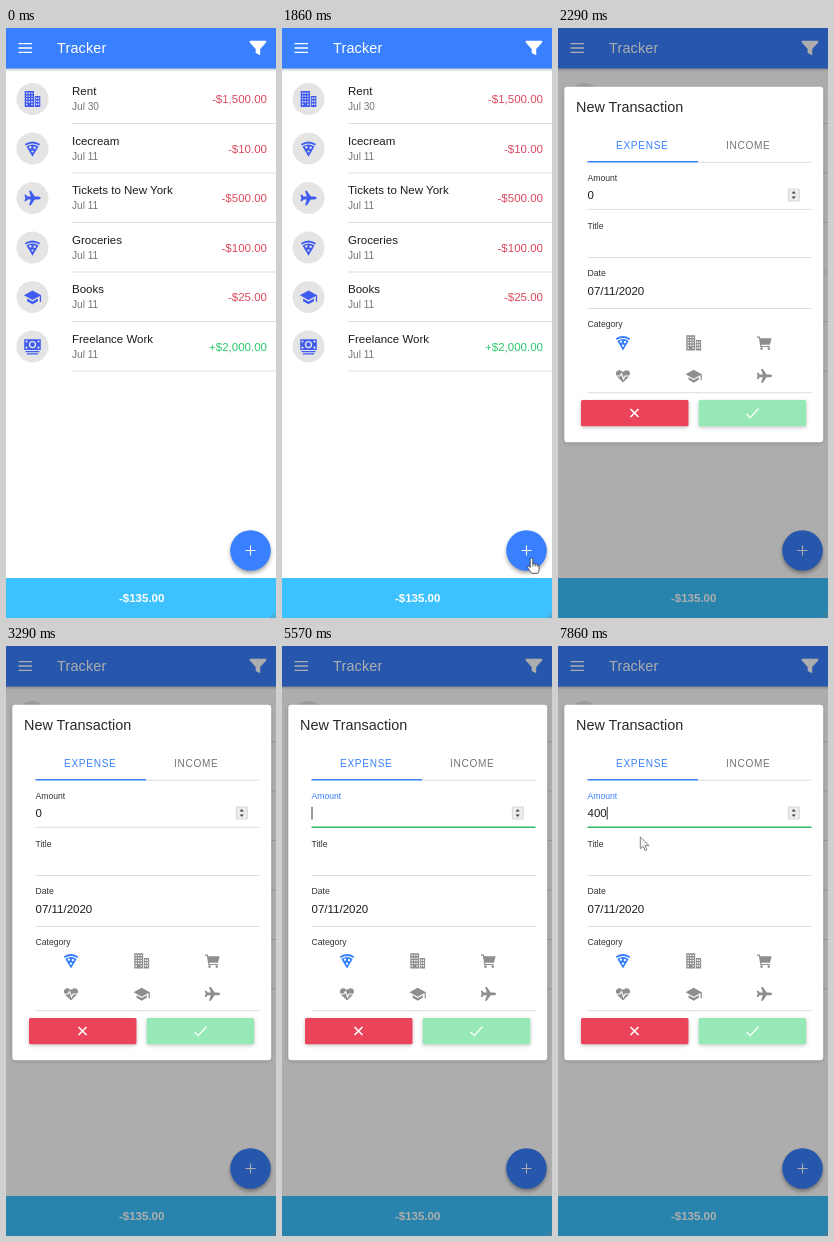
Animation of 270 by 590 pixels, one loop 8000 ms. Source, as an HTML page:

```html
<!DOCTYPE html>
<html lang="en">
<head>
<meta charset="utf-8">
<title>Tracker</title>
<style>
  html, body { margin: 0; width: 100%; height: 100%; overflow: hidden; background: #fff; }
  svg { display: block; width: 270px; height: 590px; }
  text { font-family: "Liberation Sans", Arial, sans-serif; font-size: 11.52px; white-space: pre; }
  .big { font-size: 14.4px; }
  .mid { font-size: 10.08px; }
  .small { font-size: 8.64px; }
</style>
</head>
<body>
<svg id="stage" viewBox="0 0 270 590" xmlns="http://www.w3.org/2000/svg">
  <defs>
    <filter id="soft" x="-30%" y="-30%" width="160%" height="160%"><feGaussianBlur stdDeviation="2.2"/></filter>
    <linearGradient id="fade" x2="0" y2="1">
      <stop stop-color="#000" stop-opacity=".22"/><stop offset="1" stop-color="#000" stop-opacity="0"/>
    </linearGradient>
  </defs>
  <rect width="270" height="590" fill="#fff"/>
  <g id="list"></g>
  <g id="chrome"></g>
  <rect id="shade" width="270" height="590"/>
  <g id="modal"></g>
  <path d="M264.5 590L270 584.5M267.5 590L270 587.5" stroke="#777" stroke-width=".7"/>
  <g id="hand" stroke="#333" stroke-width=".8" stroke-linejoin="round" fill="#fff">
    <path d="M-1.3 1Q-1.3 -.3 0 -.3T1.3 1V5.4Q2.8 4.6 3.6 5.8Q5 5.2 5.8 6.4Q7.6 6 7.6 8V11Q7.6 13 6.3 14.8H.2Q-1.4 12.8 -3.8 9.3Q-4.6 7.8 -3.4 7.5Q-2.4 7.4 -1.3 9Z"/>
    <path d="M1.3 5.4V8M3.6 5.8V8M5.8 6.4V8.2" fill="none"/>
  </g>
  <path id="arrow" d="M0 0V12L2.8 9.5L4.7 13.8L6.6 13L4.8 8.8H8.7Z" fill="#f4f4f4" stroke="#666" stroke-width=".8" stroke-linejoin="round"/>
</svg>
<script>
const el = id => document.getElementById(id);
const BLUE = "#3880ff", RED = "#eb445a", GREEN = "#2dd36f", GREY = "#8e8e8e";

const text = (x, y, s, cls = "", fill = "#1c1c1c", more = "") =>
  `<text x="${x}" y="${y}" class="${cls}" fill="${fill}" ${more}>${s}</text>`;
const line = (x1, x2, y, color = "#dadada", w = 0.9, more = "") =>
  `<path d="M${x1} ${y}H${x2}" stroke="${color}" stroke-width="${w}" ${more}/>`;
const box = (x, y, w, h) => `M${x} ${y}h${w}v${h}h${-w}z`;
const disc = (x, y, r) => `M${x - r} ${y}a${r} ${r} 0 1 0 ${2 * r} 0a${r} ${r} 0 1 0 ${-2 * r} 0z`;

function building() {
  let d = box(-7.8, -8, 9.3, 16) + box(2.3, -3, 5.5, 11);
  for (let r = 0; r < 5; r++)
    for (let c = 0; c < 3; c++)
      if (r < 4 || c !== 1) d += box(-6.5 + c * 2.6, -6.4 + r * 2.8, 1.4, 1.4);
  for (let r = 0; r < 3; r++)
    for (let c = 0; c < 2; c++) d += box(3.3 + c * 2.1, -1.4 + r * 2.9, 1.3, 1.5);
  return d;
}

// Icon outlines, centred on 0,0 and filled even-odd
const icons = {
  building: building(),
  pizza: "M-7.6 -4.6Q0 -9.6 7.6 -4.6L6.7 -2.9Q0 -7.2 -6.7 -2.9Z M-6 -2Q0 -5.8 6 -2L0 8.2Z"
    + disc(-2.2, -1.2, 1.2) + disc(2.1, -0.7, 1.2) + disc(0, 3, 1.1),
  plane: "M8.2 0Q8.2 -1.3 6 -1.4H2.3L-1.6 -7.2H-3.5L-1.7 -1.4H-4.9L-6.4 -3.3H-8.1L-7.1 0L-8.1 3.3H-6.4L-4.9 1.4H-1.7L-3.5 7.2H-1.6L2.3 1.4H6Q8.2 1.3 8.2 0Z",
  school: "M0 -6.4L8.6 -1.7V4.8H7.3V-.9L0 3.1L-8.6 -1.7Z M-5.4 1.4L0 4.4L5.4 1.4V4.2L0 7.2L-5.4 4.2Z",
  cash: box(-8.3, -7.2, 16.6, 10.6) + disc(0, -1.9, 3.7) + disc(0, -1.9, 2.3)
    + disc(-6, -5, 1.1) + disc(6, -5, 1.1) + disc(-6, 1.2, 1.1) + disc(6, 1.2, 1.1)
    + box(-7, 4.5, 14, 1.3) + box(-5.6, 6.7, 11.2, 1.3),
  cart: "M-7.8 -6.6H-4.8L-4.2 -4.8H7.6L5.8 2H-3.4L-3.2 3.3H5.5V4.5H-4.3L-5.8 -5.3H-7.8Z"
    + disc(-3, 6.1, 1.4) + disc(4.6, 6.1, 1.4),
  heart: "M0 7L-6.4 .8C-9.2 -3 -5.6 -8.6 0 -4C5.6 -8.6 9.2 -3 6.4 .8Z"
};
const icon = (name, x, y, fill, k = 1) =>
  `<path transform="translate(${x} ${y}) scale(${k})" d="${icons[name]}" fill="${fill}" fill-rule="evenodd"/>`;

const rows = [
  ["Rent", "Jul 30", "-$1,500.00", "building"],
  ["Icecream", "Jul 11", "-$10.00", "pizza"],
  ["Tickets to New York", "Jul 11", "-$500.00", "plane"],
  ["Groceries", "Jul 11", "-$100.00", "pizza"],
  ["Books", "Jul 11", "-$25.00", "school"],
  ["Freelance Work", "Jul 11", "+$2,000.00", "cash"]
];
el("list").innerHTML = rows.map(([name, date, sum, pic], i) => {
  const y = i * 49.5;
  return `<circle cx="26.5" cy="${y + 71}" r="16" fill="#e4e4e4"/>`
    + icon(pic, 26.5, y + 71, "#405cf0")
    + text(66, y + 67, name)
    + text(66, y + 82.3, date, "mid", "#757575")
    + text(261, y + 75, sum, "", sum[0] === "+" ? "#2bc96b" : "#dc485e", 'text-anchor="end"')
    + line(66, 270, y + 95.5);
}).join("");

el("chrome").innerHTML =
  `<rect y="40" width="270" height="4" fill="url(#fade)"/>
   <rect width="270" height="40.5" fill="${BLUE}"/>
   <path d="M12.5 15.6H26M12.5 20H26M12.5 24.4H26" stroke="#fff" stroke-width="1.4"/>
   <path d="M244.6 12.8H259.3Q261 13.1 259.9 14.7L254.2 21V27.2L249.7 25V21L244 14.7Q242.9 13.1 244.6 12.8Z" fill="#fff"/>`
  + text(51, 25.2, "Tracker", "big", "#fff", 'letter-spacing=".18"')
  + `<circle cx="244.5" cy="525" r="20" opacity=".38" filter="url(#soft)"/>
   <circle cx="244.5" cy="522.5" r="20.3" fill="${BLUE}"/>
   <path d="M239.5 522.5H249.5M244.5 517.5V527.5" stroke="#fff" stroke-width="1.1"/>
   <rect y="550" width="270" height="40" fill="#3dc2ff"/>`
  + text(135.7, 574.3, "-$135.00", "", "#fff", 'text-anchor="middle" font-weight="bold"');

const button = (x, fill) =>
  `<rect x="${x}" y="373.5" width="107.5" height="26" rx="1.5" opacity=".22" filter="url(#soft)"/>
   <rect x="${x}" y="372" width="107.5" height="26.3" rx="1.5" fill="${fill}"/>`;
const choices = [["pizza", "building", "cart"], ["heart", "school", "plane"]];

el("modal").innerHTML =
  `<rect x="6.5" y="61" width="258.5" height="354" rx="3" opacity=".2" filter="url(#soft)"/>
   <rect x="6.3" y="58.7" width="258.9" height="355.5" rx="3" fill="#fff"/>`
  + text(18, 84, "New Transaction", "big", "#2a2a2a")
  + text(58, 121, "EXPENSE", "mid", BLUE, 'letter-spacing=".7"')
  + text(168, 121, "INCOME", "mid", "#737373", 'letter-spacing=".7"')
  + line(140, 253.5, 134.3) + line(29.5, 140, 133.7, BLUE, 1.5)
  + text(29.5, 153.3, "Amount", "small", "#333", 'id="label"')
  + text(29.5, 171.4, "0", "", "#1c1c1c", 'id="value"')
  + `<rect x="230.2" y="161" width="11" height="12" fill="#ededed" stroke="#c4c4c4" stroke-width=".6"/>
     <path d="M233.6 165.6L235.7 162.9L237.8 165.6ZM233.6 168.4L235.7 171.1L237.8 168.4Z" fill="#444"/>`
  + line(29.5, 253.5, 181.4)
  + line(29.5, 253.5, 181.3, "#32b868", 1.4, 'id="focus"')
  + text(29.5, 200.8, "Title", "small", "#333")
  + line(29.5, 253.5, 229.5)
  + text(29.5, 248, "Date", "small", "#333")
  + text(29.5, 267.4, "07/11/2020")
  + line(29.5, 253.5, 280.5)
  + text(29.5, 299, "Category", "small", "#333")
  + choices.map((names, r) => names.map((n, c) =>
      icon(n, 65 + c * 70.7, 314.8 + r * 33, r + c ? GREY : BLUE, 0.95)).join("")).join("")
  + '<path d="M57.5 348H62L63.5 345.5L65.5 351L67 348H72.5" fill="none" stroke="#fff" stroke-width="1.1"/>'
  + line(29.5, 253.5, 364.7)
  + button(23, RED) + button(140.7, "#96e9b7")
  + `<path d="M72.5 381L80.5 389M80.5 381L72.5 389" stroke="#fff" stroke-width="1.6"/>
     <path d="M188.5 386L192.3 389.6L200.5 380.5" fill="none" stroke="#fff" stroke-width="1.2"/>
     <path id="caret" d="M0 160.8V173.6" stroke="#222" stroke-width=".9"/>
     <path id="drop" d="M36 175.4L41.4 181.6A7.4 7.4 0 1 1 30.6 181.6Z" fill="#35a3e0"/>`;

const LOOP = 8000, STEP = LOOP / 56;
const typed = [[0, "0"], [39, ""], [41, "4"], [48, "40"], [49, "400"]];
const blinks = [31, 35, 39, 43, 46, 50, 54];
const entry = [[264, 572], [259, 557], [253, 541], [249.5, 530.5]];

const show = (id, on) => el(id).setAttribute("visibility", on ? "visible" : "hidden");
const place = (id, x, y) => el(id).setAttribute("transform", `translate(${x} ${y})`);

function draw(ms) {
  // The screen refreshes seven times a second
  const n = Math.floor((ms % LOOP + 5) / STEP);

  const open = n < 15 ? 0 : n < 16 ? 0.775 : 1;
  el("shade").setAttribute("opacity", 0.32 * open);
  el("modal").setAttribute("opacity", open);
  place("modal", 0, 40 * (1 - open));

  const focused = n >= 31;
  el("label").setAttribute("fill", focused ? BLUE : "#333");
  el("focus").setAttribute("opacity", n < 31 ? 0 : n < 32 ? 0.6 : 1);
  const value = typed.filter(([at]) => at <= n).pop()[1];
  el("value").textContent = value;
  place("caret", 30 + value.length * 6.41, 0);
  show("caret", blinks.filter(at => at <= n).length % 2);
  show("drop", n >= 32 && n < 39);

  const moving = n >= 10 && n < 13, end = n >= 55;
  show("arrow", moving || end);
  if (moving) place("arrow", ...entry[n - 10]);
  else place("arrow", 82.3, 190.8);
  show("hand", n === 13 || n === 14);
  place("hand", ...entry[3]);
}

function tick() {
  draw(performance.now());
  requestAnimationFrame(tick);
}
tick();
</script>
</body>
</html>
```
